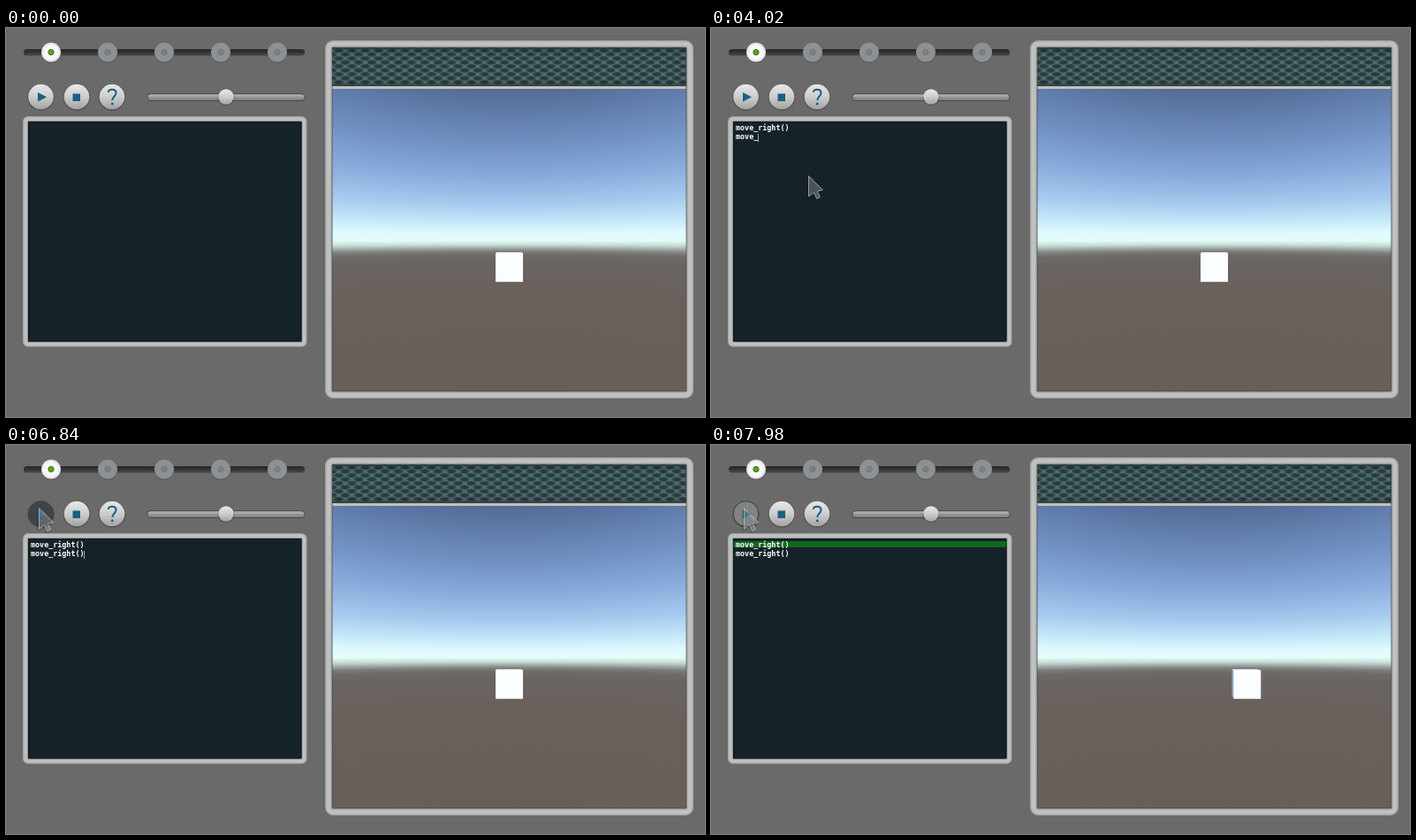
Recreate the animation shown at these times as an HTML page with a canvas. Size 791 px wide and 441 px high, loop 8 s.

```html
<!DOCTYPE html>
<html lang="en">
<head>
<meta charset="utf-8">
<title>Code and move</title>
<style>
  html, body { margin: 0; width: 100%; height: 100%; overflow: hidden; background: #6a6a6a; }
  #world { position: absolute; left: 369px; top: 69px; }
  svg { position: absolute; left: 0; top: 0; }
  text { font: bold 8.4px "DejaVu Sans Mono", monospace; fill: #fff; }
</style>
</head>
<body>
<canvas id="world" width="402" height="344"></canvas>
<svg id="stage" width="791" height="441" viewBox="0 0 791 441">
  <defs>
    <linearGradient id="rail" x2="0" y2="1">
      <stop stop-color="#282828"/><stop offset=".5" stop-color="#343434"/><stop offset="1" stop-color="#4c4c4c"/>
    </linearGradient>
    <linearGradient id="track" x2="0" y2="1">
      <stop stop-color="#bababa"/><stop offset=".5" stop-color="#969696"/><stop offset="1" stop-color="#7c7c7c"/>
    </linearGradient>
    <linearGradient id="silver" x2="0" y2="1">
      <stop stop-color="#e8e8e8"/><stop offset=".5" stop-color="#cdcdcd"/><stop offset="1" stop-color="#a2a2a2"/>
    </linearGradient>
    <radialGradient id="lamp">
      <stop stop-color="#fff"/><stop offset=".75" stop-color="#f6f6f6"/><stop offset="1" stop-color="#d8d8d8"/>
    </radialGradient>
    <radialGradient id="hole">
      <stop stop-color="#22363a"/><stop offset=".65" stop-color="#2b4145"/><stop offset="1" stop-color="#425b5c"/>
    </radialGradient>
    <linearGradient id="meshShade" x2="0" y2="1">
      <stop stop-color="#0d1719" stop-opacity=".4"/><stop offset=".2" stop-color="#0d1719" stop-opacity="0"/>
      <stop offset=".85" stop-color="#0d1719" stop-opacity="0"/><stop offset="1" stop-color="#0d1719" stop-opacity=".25"/>
    </linearGradient>
    <pattern id="mesh" x="369" y="21" width="15" height="9" patternUnits="userSpaceOnUse">
      <rect width="15" height="9" fill="#546e6d"/>
      <g id="holes" fill="url(#hole)"></g>
    </pattern>
    <filter id="soft" x="-50%" y="-50%" width="200%" height="200%"><feGaussianBlur stdDeviation="1.2"/></filter>
  </defs>

  <g id="steps"><rect x="20" y="24" width="318" height="7.5" rx="3.5" fill="url(#rail)"/></g>
  <g id="buttons"></g>

  <g id="slider">
    <rect x="159.5" y="74.3" width="179" height="8.7" rx="4.3" fill="#484848"/>
    <rect x="160.5" y="75.3" width="177" height="6.7" rx="3.3" fill="url(#track)"/>
    <circle cx="249" cy="78.6" r="9.4" fill="#333" opacity=".5"/>
    <circle cx="249" cy="78" r="8.7" fill="url(#silver)"/>
  </g>

  <g id="editor">
    <rect x="24" y="106" width="311.5" height="250" fill="#152328"/>
    <rect id="line" x="25" y="109" width="310" height="7" fill="#0f681d"/>
    <text id="row0" x="28" y="116"></text>
    <text id="row1" x="28" y="126"></text>
    <rect id="caret" width="1" height="9" fill="#9ba6a8"/>
  </g>

  <g id="view">
    <rect x="369" y="21" width="402" height="44" fill="url(#mesh)"/>
    <rect x="369" y="21" width="402" height="44" fill="url(#meshShade)"/>
    <rect x="369" y="64" width="402" height="2" fill="#3b4443"/>
    <rect x="369" y="66" width="402" height="3" fill="#c0c2be"/>
    <path id="side" fill="#86addc"/>
    <path id="face" fill="#fbfeff"/>
  </g>
  <g id="frames" fill="none"></g>

  <g id="cursor">
    <path d="M0 0V25L6.4 20.2 9.4 27 13.8 25 10.8 18.4 17 17Z" transform="translate(-1 2)" fill="#000" opacity=".2" filter="url(#soft)"/>
    <path d="M.5 .8V24L6.5 19.6 9.6 26.5 13.4 24.8 10.3 18 16.4 16.6Z"
      fill="#b4b8bc" fill-opacity=".36" stroke="#d0d4d6" stroke-opacity=".62"/>
  </g>
</svg>
<script>
const $ = id => document.getElementById(id);
const add = (id, markup) => $(id).insertAdjacentHTML('beforeend', markup);
const set = (id, attrs) => { for (const k in attrs) $(id).setAttribute(k, attrs[k]); };
const show = (id, on) => set(id, { visibility: on ? 'visible' : 'hidden' });

// Progress lamps
for (let i = 0; i < 5; i++) {
  const x = 51 + 64 * i, on = i === 0;
  add('steps', `<circle cx="${x}" cy="28" r="11.5" fill="#444" opacity=".4"/>
    <circle cx="${x}" cy="27.5" r="11" fill="${on ? 'url(#lamp)' : '#8f9091'}"/>
    <circle cx="${x}" cy="27.5" r="3.2" fill="${on ? '#55a51e' : '#75838c'}"
      stroke="${on ? '#35681b' : '#68747c'}" stroke-width=".8"/>`);
}

// Round buttons
const icons = [
  '<path d="M36 73L46 78.3 36 83.5Z" fill="#1b6180"/>',
  '<rect x="75.5" y="74.5" width="8.5" height="8.5" fill="#1b6180"/>',
  `<path d="M115.8 73C116 70.7 117.8 69.7 120 69.7C122.8 69.7 124.6 71.2 124.6 73.6C124.6 77.4 120.3 77.6 120.3 82"
    fill="none" stroke="#1b6180" stroke-width="2"/><circle cx="120.3" cy="86" r="1.4" fill="#1b6180"/>`
];
[39.5, 80, 120].forEach((x, i) => add('buttons',
  `<circle cx="${x}" cy="78.6" r="15.2" fill="#3b3b3b" opacity=".5"/>
   <circle cx="${x}" cy="78" r="14.3" fill="url(#silver)"/>
   ${i ? '' : '<circle id="press" cx="39.5" cy="78" r="14.3" stroke="#3a3c3d"/>'}${icons[i]}`));

// Mesh holes, staggered
for (const [x, y] of [[7.5, 4.5], [0, 0], [15, 0], [0, 9], [15, 9]])
  add('holes', `<ellipse cx="${x}" cy="${y}" rx="5.8" ry="2.9"/>`);

// Sky and ground: lines of equal elevation bend away from the eye level
const midX = 569.5, eyeY = 241, focal = 298;
const tones = [
  [69, '#546b94'], [100, '#617dab'], [135, '#7292c4'], [170, '#89acdc'], [200, '#a6caee'],
  [220, '#c5e7f9'], [233, '#dffaff'], [241, '#e4fdfa'], [246, '#c6dad6'], [250, '#9aa5a2'],
  [253, '#7d7f7d'], [257, '#6e6b68'], [265, '#6a6461'], [300, '#69605b'], [413, '#685e58']
];
function drawWorld() {
  const ctx = $('world').getContext('2d');
  for (let x = 0; x < 402; x++) {
    const bend = Math.hypot(1, (x + 369.5 - midX) / focal);
    const grad = ctx.createLinearGradient(0, 172 - 172 * bend, 0, 172 + 172 * bend);
    for (const [y, c] of tones) grad.addColorStop((y - eyeY) / 344 + .5, c);
    ctx.fillStyle = grad;
    ctx.fillRect(x, 0, 1, 344);
  }
}
drawWorld();

// Bevelled frames: inset from the outer edge, width, colour
function bevel(x, y, w, h, r, rings) {
  for (const [inset, width, color] of rings)
    add('frames', `<rect x="${x + inset}" y="${y + inset}" width="${w - 2 * inset}" height="${h - 2 * inset}"
      rx="${Math.max(1, r - inset)}" stroke="${color}" stroke-width="${width}"/>`);
}
bevel(19, 100, 321.5, 261.5, 6, [[3, 6, '#a2a5a3'], [3, 3.6, '#bec1bf'], [6.4, .8, '#0c1518']]);
bevel(361, 14, 417, 406, 9, [[4, 8, '#a2a5a3'], [4, 5, '#bfc2c0'], [8.2, .6, '#3e4344']]);

const charW = 5.057, word = 'move_right()';
const keys = [
  [1140, 1200, 1320, 1380, 1680, 1980, 2040, 2160, 2220, 2400, 2640, 2880],
  [3540, 3600, 3780, 3840, 4020, 4260, 4320, 4500, 4560, 4680, 5040, 5580]
];
const newline = 3240, run = 6900;
const clamp = p => Math.max(0, Math.min(1, p));
const mix = (a, b, p) => a + (b - a) * p;
const easeOut = p => 1 - (1 - p) ** 2;
const easeInOut = p => p * p * (3 - 2 * p);

function drawText(t) {
  const typed = keys.map(row => row.filter(k => k <= t).length);
  typed.forEach((n, i) => { $('row' + i).textContent = word.slice(0, n); });
  const row = t >= newline ? 1 : 0;
  set('caret', { x: Math.floor(28 + typed[row] * charW), y: 110 + row * 10 });
  show('caret', t >= 540 && t < run && !(t >= 960 && t < 1140));
  show('line', t >= run);
}

function drawCursor(t) {
  const a = easeOut(clamp((t - 180) / 360)), b = easeInOut(clamp((t - 6180) / 540));
  const x = mix(mix(208, 110, a), 37, b), y = mix(mix(45, 167, a), 71, b);
  set('cursor', { transform: `translate(${x.toFixed(1)} ${y.toFixed(1)})` });
  show('cursor', t >= 180);
  const pressed = t >= 6780 && t < run;
  set('press', { fill: pressed ? '#414446' : '#828484' });
  show('press', t >= 6780);
}

function drawCube(t) {
  const depth = .92, half = 15.5;
  const off = Math.max(0, t - run) * .0345;
  const l = midX + off - half, r = midX + off + half;
  const bl = midX + (off - half) * depth, br = midX + (off + half) * depth;
  set('face', { d: `M${l} 255.6L${Math.max(bl, l - 2.5)} 254.2H${br}L${r} 255.6V287.7H${l}Z` });
  set('side', { d: bl < l ? `M${l} 255.6L${bl} 254.2V284L${l} 287.7Z` : '' });
}

const start = performance.now();
function frame() {
  const now = (performance.now() - start) % 8000;
  const t = Math.floor(now / 60) * 60;
  drawText(t);
  drawCursor(t);
  drawCube(t);
  requestAnimationFrame(frame);
}
frame();
</script>
</body>
</html>
```
